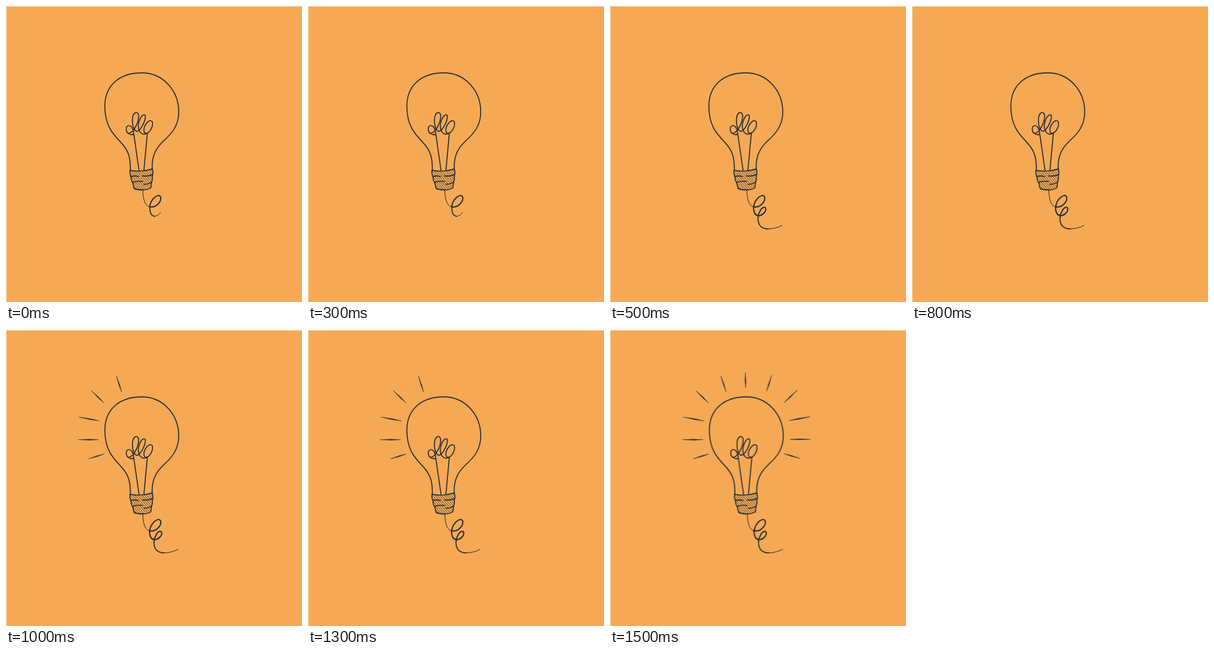
Recreate the animation shown at these times as an HTML page. Size 425 px wide and 425 px high, loop 2000 ms.

```html
<!DOCTYPE html>
<html lang="en">
<head>
<meta charset="utf-8">
<title>Light bulb</title>
<style>
  html, body { margin: 0; width: 100%; height: 100%; overflow: hidden; background: #f6a954; }
  svg { display: block; width: 100vw; height: 100vh; }
  .ink { fill: none; stroke: #1d2a36; stroke-width: 1.4; stroke-linecap: round; stroke-linejoin: round; }
  .bold { stroke-width: 1.7; }
  .thin { stroke-width: .9; }
  .hatch { stroke-width: .65; }
  .rays { fill: #1d2a36; stroke: #1d2a36; stroke-width: .4; stroke-linejoin: round; }

  .scene { animation: nudge 2s step-end infinite; }
  .short { animation: first 2s step-end infinite; }
  .long { animation: after-first 2s step-end infinite; }
  .left { animation: second-half 2s step-end infinite; }
  .right { animation: last 2s step-end infinite; }

  @keyframes nudge { 0% { transform: none; } 75% { transform: translateX(.7px); } }
  @keyframes first { 0% { opacity: 1; } 25%, 100% { opacity: 0; } }
  @keyframes after-first { 0% { opacity: 0; } 25%, 100% { opacity: 1; } }
  @keyframes second-half { 0% { opacity: 0; } 50%, 100% { opacity: 1; } }
  @keyframes last { 0% { opacity: 0; } 75%, 100% { opacity: 1; } }
</style>
</head>
<body>
<svg viewBox="0 0 425 425">
  <defs>
    <clipPath id="cap"><path d="M178 236Q194 239 210 234L211 244 208 262Q196 266 184 262L180 248Z"/></clipPath>
  </defs>
  <rect width="425" height="425" fill="#f6a954"/>
  <path d="M0 .5H425M.5 0V425" stroke="#fbd5a8"/>

  <g class="scene">
    <g class="ink">
      <!-- glass -->
      <path d="M178.500 236C179 216 175 207 166 197C154 184 142.500 173 142 146C141 114 163 96 195 96C226 96 248 122 248 152C248 172 238 183 227 193C214 205 209 217 210 235"/>
      <!-- filament -->
      <path d="M191 236L183.500 184C177 187 171 180 173 174C177 168 183 174 183.500 184"/>
      <path d="M174 182C181 186 191 168 190.500 157C189 150 182 152 181.500 163C181 172 184 179 188 180C193 179 201 165 200 157C196 153 190 164 190 173C190 180 194 184 198 184C206 184 212 173 210 166C206 161 198 171 198 178C198 182 200 184 203 182L198 236"/>
      <!-- cap -->
      <path d="M178 236Q194 239 210 234Q212 239 210 245Q211 248 209 253L208 261Q204 264 196 264Q188 264 184 262L182 254Q179 250 179.500 246Q177 241 178 236"/>
      <path d="M179.500 245Q185 243 190 245M196 244Q204 245 210 242M182 253Q190 251 196 252M198 256Q204 256 209 253"/>
      <path id="hatch" class="hatch" clip-path="url(#cap)"/>
      <!-- cord -->
      <path class="thin" d="M196.500 264C196.500 276 199 287 206 288.500"/>
      <path class="bold" d="M206 288.500C216 290 224 280 222 274C218 268 208 278 206.500 287"/>
      <g class="short">
        <path d="M206.500 287C206 295 208 301 213 302" />
        <path class="thin" d="M213 302C217 302 220 299 222 296.500"/>
      </g>
      <g class="long">
        <path class="bold" d="M206.500 287C205 296 209 302 215 301C222 299 225 293 223 289.500C218 287 213 297 212.500 304"/>
        <path d="M212.500 304C212 314 217 320 227 320"/>
        <path class="thin" d="M227 320C235 320 241 318 247 315"/>
      </g>
    </g>
    <path class="rays left"/>
    <path class="rays right"/>
  </g>
</svg>
<script>
  // Each ray is a sliver that tapers towards both ends.
  const ray = ([x1, y1, x2, y2]) => {
    const dx = x2 - x1, dy = y2 - y1, k = .7 / Math.hypot(dx, dy);
    const mx = x1 + dx * .55, my = y1 + dy * .55;
    return `M${x1} ${y1}L${mx - dy * k} ${my + dx * k} ${x2} ${y2} ${mx + dy * k} ${my - dx * k}Z`;
  };
  const drawRays = (side, rays) =>
    document.querySelector(side).setAttribute('d', rays.map(ray).join(''));

  drawRays('.left', [
    [158.5, 66, 166, 89], [122.500, 87, 141, 105], [104.5, 125, 134, 130.5],
    [103.5, 157.5, 133, 157.5], [118.5, 185, 141, 178]
  ]);
  drawRays('.right', [
    [193.5, 61, 194, 83], [231.5, 65, 224, 88], [268.5, 86, 249, 104.5],
    [286.5, 124.5, 256.5, 130], [287, 157, 257.5, 157], [272, 184.5, 249, 177.5]
  ]);

  let hatch = '';
  for (let x = 150; x < 212; x += 3.4) hatch += `M${x} 232l30 34`;
  document.getElementById('hatch').setAttribute('d', hatch);
</script>
</body>
</html>
```
